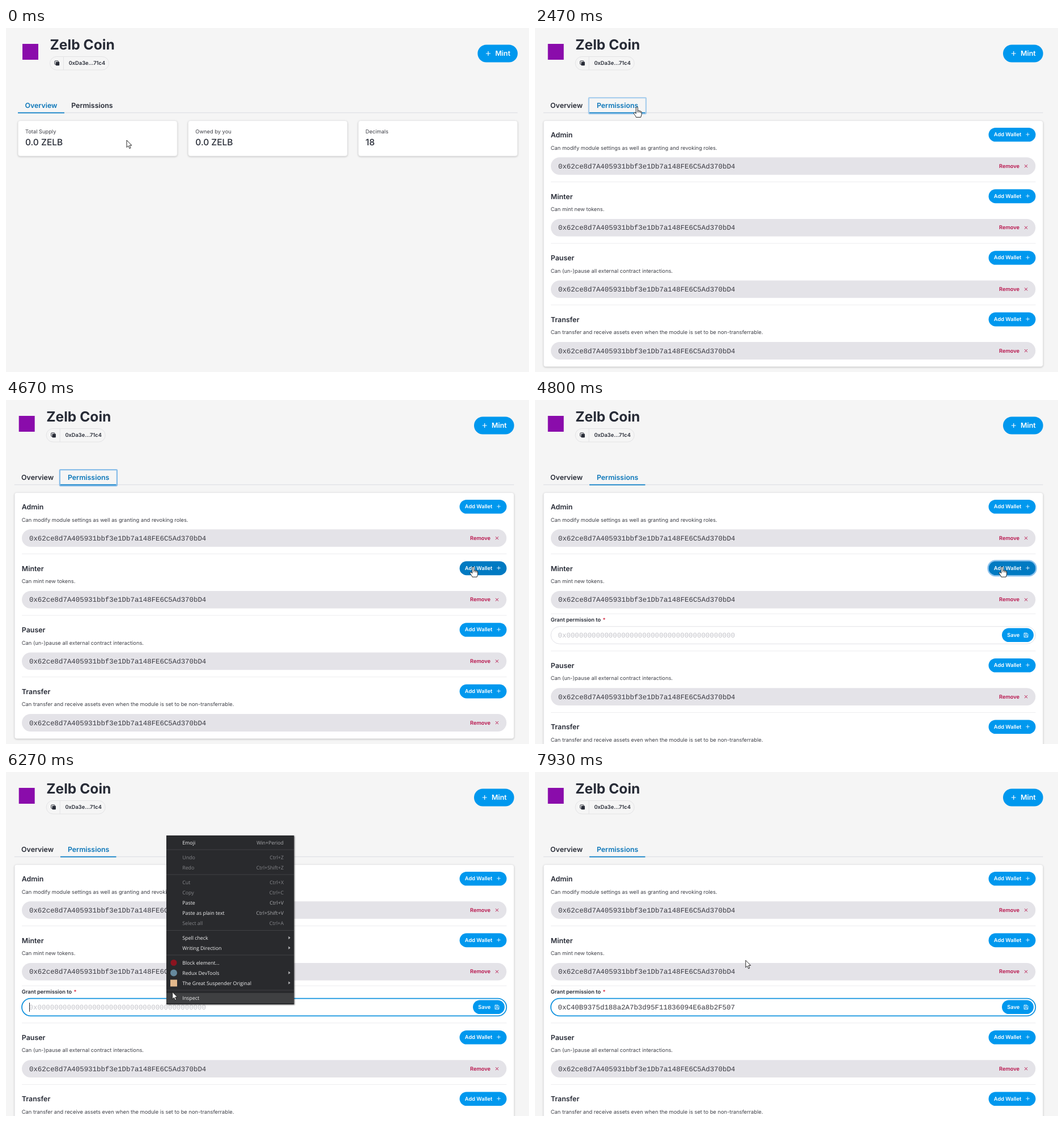
An HTML page for the animation above (8 s loop, 923x607 px).

```html
<!DOCTYPE html>
<html lang="en">
<head>
<meta charset="utf-8">
<title>Token permissions</title>
<style>
  html, body { margin: 0; width: 100%; height: 100%; overflow: hidden; background: #f5f5f5; }
  svg { display: block; font: 9.3px Inter, sans-serif; fill: #272b36; text-rendering: geometricPrecision; }
  .title { font-size: 24.6px; font-weight: 700; }
  .h { font-size: 12.4px; font-weight: 600; }
  .value { font-size: 15.5px; font-weight: 500; }
  .small { font-weight: 600; }
  .body { fill: #3f4048; }
  .mono { font: 12.4px "Liberation Mono", monospace; fill: #3a3a42; }
  .white { fill: #fff; }
  .active { fill: #0b76b9; }
  .red { fill: #b8114a; }
  .blue { fill: #0098ee; }
  .line { fill: none; stroke-width: 1; }
  .card { fill: #fff; stroke: #e6e6e8; stroke-width: .8; filter: drop-shadow(0 1.5px 1.5px #0003); }
  .ring { fill: none; stroke: #4299e1; stroke-opacity: .6; stroke-width: 2.3; }
  .menu { font: 8.85px "Open Sans", sans-serif; fill: #f1f1f2; }
  .keys { fill: #a9aaad; text-anchor: end; }
  .hot .keys { fill: #f1f1f2; }
  .off, .off .keys { fill: #85868a; }
</style>
</head>
<body>
<svg id="stage" width="923" height="607" viewBox="0 0 923 607"></svg>
<script>
const LOOP = 8000;
const T = { tab: 2330, add: 4670, open: 4730, focus: 6000, menu: 6070, paste: 7330 };
const COIN = 'Zelb Coin', TICKER = 'ZELB', SHORT = '0xDa3e...71c4';
const OWNER = '0x62ce8d7A405931bbf3e1Db7a148FE6C5Ad370bD4';
const GRANTEE = '0xC40B9375d188a2A7b3d95F11836094E6a8b2F507';

const text = (x, y, s, cls, id = '') => `<text x="${x}" y="${y}" class="${cls}" id="${id}">${s}</text>`;
const rect = (x, y, w, h, r, attrs) => `<rect x="${x}" y="${y}" width="${w}" height="${h}" rx="${r}" ${attrs}/>`;
const path = (d, attrs) => `<path d="${d}" ${attrs}/>`;
const plus = (x, y, r, w = 1) => path(`M${x - r} ${y}h${2 * r}M${x} ${y - r}v${2 * r}`, `stroke="#fff" style="stroke-width:${w}"`);
const rule = y => path(`M28 ${y}H883.5`, 'class="line" stroke="#ececef"');

const header = `
  ${rect(29, 28, 28, 28, 0, 'fill="#8a0cab"')}
  ${text(77.5, 38, COIN, 'title')}
  ${rect(77.5, 50.5, 104, 23.5, 11.7, 'fill="none" stroke="#e3e3e5"')}
  ${path('M101.5 50.5v23.5', 'stroke="#e3e3e5"')}
  ${rect(86, 58, 6.3, 6.3, 1, 'fill="none" stroke="#272b36"')}
  ${rect(87.8, 59.8, 6.4, 6.4, 1, '')}
  ${text(110.7, 64.5, SHORT, 'small')}
  ${rect(832.3, 29.5, 70.7, 31, 15.5, 'class="blue"')}
  ${plus(851, 45, 4, 1.2)}
  ${text(863.4, 49, 'Mint', 'h white')}
  ${path('M21 149.6H902.8', 'stroke="#e1e2e6" stroke-width="1.5"')}
  ${path('', 'id="underline" stroke="#0b7fc7" stroke-width="1.6"')}
  ${text(33.4, 141, 'Overview', 'h', 'tab1')}
  ${text(115.2, 141, 'Permissions', 'h', 'tab2')}`;

const card = (x, label, value) => rect(x, 163.5, 281, 62.5, 4, 'class="card"') +
  text(x + 12.8, 186, label, 'body') + text(x + 12.8, 207, value, 'value');

const overview = card(21.2, 'Total Supply', `0.0 ${TICKER}`) +
  card(321.5, 'Owned by you', `0.0 ${TICKER}`) + card(621.8, 'Decimals', '18');

const role = (i, name, about) => {
  const y = 163.5 + i * 108.6;
  return text(27.8, y + 29.5, name, 'h') +
    text(27.8, y + 51, about, 'body') +
    rect(800.5, y + 12.5, 83, 24.6, 12.3, `class="blue" id="add${i}"`) +
    text(809.8, y + 27.6, 'Add Wallet', 'small white') +
    plus(869.6, y + 24.3, 3.2, .8) +
    rect(28, y + 64.8, 855.3, 30.8, 15.4, 'fill="#e4e3e8"') +
    text(41, y + 84.3, OWNER, 'mono') +
    text(819, y + 83.3, 'Remove', 'small red') +
    path(`M864 ${y + 77.7}l5 5m0-5l-5 5`, 'stroke="#b8114a"') +
    (i < 3 ? `<g id="rule${i}">${rule(y + 108)}</g>` : '');
};

const form = `
  ${rule(377.2)}
  ${text(27.8, 391.3, 'Grant permission to <tspan fill="#d3263f" dx="1">*</tspan>', 'small')}
  ${rect(28, 399.7, 855.3, 30.6, 15.3, 'id="input" fill="#fff"')}
  ${text(40.6, 419.3, '', 'mono', 'entry')}
  ${path('', 'id="caret" stroke="#272b36"')}
  ${rect(824, 402.5, 56, 24.6, 12.3, 'class="blue"')}
  ${text(833.2, 418, 'Save', 'small white')}
  ${path('M863 411.2h5l2 2v5.3h-7zM864.8 411.2v2.3h3v-2.3M864.8 418.5v-3h3.6v3', 'class="line" stroke="#fff" style="stroke-width:.8"')}`;

const permissions = `
  <rect x="15.2" y="163.5" width="881.3" rx="4" class="card" id="panel"/>
  ${role(0, 'Admin', 'Can modify module settings as well as granting and revoking roles.')}
  ${role(1, 'Minter', 'Can mint new tokens.')}
  <g id="form">${form}</g>
  <g id="lower">
    ${role(2, 'Pauser', 'Can (un-)pause all external contract interactions.')}
    ${role(3, 'Transfer', 'Can transfer and receive assets even when the module is set to be non-transferrable.')}
  </g>
  ${rect(94.9, 123.1, 101, 28.2, 1, 'class="ring" id="tabRing"')}
  ${rect(799.4, 283.5, 85.2, 26.8, 13.4, 'class="ring" id="addRing"')}`;

// label, row centre, shortcut ('>' for a submenu), disabled
const items = [
  ['Emoji', 125, 'Win+Period'],
  ['Undo', 151, 'Ctrl+Z', 1], ['Redo', 169, 'Ctrl+Shift+Z', 1],
  ['Cut', 195, 'Ctrl+X', 1], ['Copy', 213, 'Ctrl+C', 1],
  ['Paste', 231, 'Ctrl+V'], ['Paste as plain text', 248.8, 'Ctrl+Shift+V'], ['Select all', 266.6, 'Ctrl+A', 1],
  ['Spell check', 293, '>'], ['Writing Direction', 310.8, '>'],
  ['Block element...', 337, ''], ['Redux DevTools', 354.8, '>'], ['The Great Suspender Original', 372.6, '>'],
  ['Inspect', 399, '']
];
const item = ([label, y, key, off]) => `<g class="item ${off ? 'off' : ''}">
  ${rect(283, y - 9, 225, 18, 0, 'fill="#3f4042" visibility="hidden"')}
  ${text(311.2, y + 3.2, label, '')}
  ${key === '>' ? path(`M498.5 ${y - 3.2}l3.4 2.7l-3.4 2.7z`, 'fill="#b5b6b8"') : text(490, y + 3.2, key, 'keys')}</g>`;

const menu = rect(283, 112, 225.3, 298, 0, 'fill="#292a2d" style="filter:drop-shadow(1.5px 1.5px 1px #0008)"') +
  [137, 181, 279.5, 323, 385].map(y => path(`M283 ${y}h225`, 'stroke="#404144"')).join('') +
  items.map(item).join('') +
  `<circle cx="296" cy="336.5" r="5.5" fill="#8c1420"/><circle cx="296" cy="354.6" r="6" fill="#66899d"/>` +
  rect(290, 366.5, 12, 12, 0, 'fill="#e3b88c"');

const pointers = {
  arrow: 'M0 0V12.6L2.9 9.9L4.9 14.6L7 13.7L5 9.1H8.9Z',
  hand: 'M-1.5 1.4a1.5 1.5 0 0 1 3 0V6.6c.4-.9 2.4-.7 2.6.5c.5-.8 2.2-.5 2.4.7c.7-.5 1.8-.1 1.8 1.2V13c0 2-1.4 3-1.4 5H-1.4C-2 15.8-4 13.8-5.3 11.4C-6 10-4.2 9-3 10L-1.5 11.5ZM1.5 6.6v3M4.1 7.1v2.8M6.5 7.8v2.6',
  beam: 'M-2.5-6H-.6L0-5.4L.6-6H2.5M0-5.4V5.4M-2.5 6H-.6L0 5.4L.6 6H2.5'
};

stage.innerHTML = `
  <g id="head">${header}</g>
  <g id="overview">${overview}</g>
  <g id="permissions">${permissions}</g>
  <g id="menu" class="menu">${menu}</g>
  <path id="pointer" stroke="#111" stroke-width=".9" stroke-linejoin="round"/>`;

const $ = id => document.getElementById(id);
const set = (id, attrs) => { for (const k in attrs) $(id).setAttribute(k, attrs[k]); };
const show = (id, on) => set(id, { display: on ? 'inline' : 'none' });
const ramp = (t, start, span) => Math.max(0, Math.min(1, (t - start) / span));
const rows = [...document.querySelectorAll('.item')];

// time, x, y of the pointer's hot spot
const track = [
  [0, 213, 198], [735, 213, 198], [1330, 176.5, 143.5], [1535, 176.5, 143.5], [1800, 179.8, 139.5],
  [2800, 179.8, 139.5], [3530, 585.8, 327], [3680, 662, 319], [3930, 810, 298], [4070, 824.3, 294.3],
  [4870, 824.3, 294.3], [5100, 780, 350], [5470, 520, 402], [5930, 283, 411], [6070, 283, 411],
  [6270, 293.7, 388.2], [6340, 293.7, 388.2], [6800, 335.7, 232.5], [7400, 335.7, 232.5],
  [7930, 371.8, 332.3], [LOOP, 371.8, 332.3]
];

function locate(t) {
  const i = track.findIndex(k => k[0] > t);
  const [t0, x0, y0] = track[i - 1], [t1, x1, y1] = track[i];
  const p = (t - t0) / (t1 - t0);
  return [x0 + (x1 - x0) * p, y0 + (y1 - y0) * p];
}

function pointerKind(t, x, y, menuOpen) {
  if (menuOpen) return 'arrow';
  if (y < 151 && x > 96 && x < 201) return 'hand';
  if (x > 800 && y > 284 && y < 309) return 'hand';
  if (t > T.open && y > 399 && y < 431 && x < 824) return 'beam';
  if (t > T.paste && y < 252) return 'beam';
  return 'arrow';
}

function draw(t) {
  const second = t >= T.tab, open = t >= T.open, focused = t >= T.focus, pasted = t >= T.paste;
  const menuOpen = t >= T.menu && !pasted;
  const [x, y] = locate(t);

  set('head', { transform: `translate(${second ? -6.3 : 0})` });
  set('underline', { d: second ? 'M102.3 149.6H200.8' : 'M21 149.6H103' });
  set('tab1', { class: second ? 'h' : 'h active' });
  set('tab2', { class: second ? 'h active' : 'h' });
  show('overview', !second);
  show('permissions', second);

  const drop = `translate(0 ${open ? 62.7 : 0})`;
  set('panel', { height: open ? 496.7 : 434 });
  set('lower', { transform: drop });
  set('rule1', { transform: drop });
  show('form', open);
  set('tabRing', { opacity: ramp(t, T.tab, 200) * (1 - ramp(t, T.add, 130)) });
  set('addRing', { opacity: ramp(t, T.add, 130) * (1 - ramp(t, T.focus, 130)) });

  const hover = ramp(t, 3900, 170) * (1 - ramp(t, 4930, 170));
  $('add1').style.fill = `rgb(0 ${152 - 30 * hover} ${238 - 44 * hover})`;

  set('input', { stroke: focused ? '#1293df' : '#e2e2e7', 'stroke-width': focused ? 1.8 : 1 });
  $('entry').textContent = pasted ? GRANTEE : '0x' + '0'.repeat(40);
  $('entry').style.fill = pasted ? '' : '#c3c3c9';
  const blink = Math.floor((t - (pasted ? T.paste : T.focus)) / 500) % 2 === 0;
  set('caret', { d: `M${pasted ? 353.5 : 41.5} 407v16`, opacity: focused && blink ? 1 : 0 });

  show('menu', menuOpen);
  rows.forEach((row, i) => {
    const [, mid, , off] = items[i];
    const reach = i === items.length - 1 ? 11.2 : 9;
    const hot = !off && menuOpen && x > 283 && Math.abs(y - mid) < reach;
    row.classList.toggle('hot', hot);
    row.firstElementChild.setAttribute('visibility', hot ? 'inherit' : 'hidden');
  });

  const kind = pointerKind(t, x, y, menuOpen);
  set('pointer', { d: pointers[kind], transform: `translate(${x} ${y})`, fill: kind === 'beam' ? 'none' : '#fff' });
}

const begin = performance.now();
function tick() {
  draw((performance.now() - begin) % LOOP);
  requestAnimationFrame(tick);
}
tick();
</script>
</body>
</html>
```
